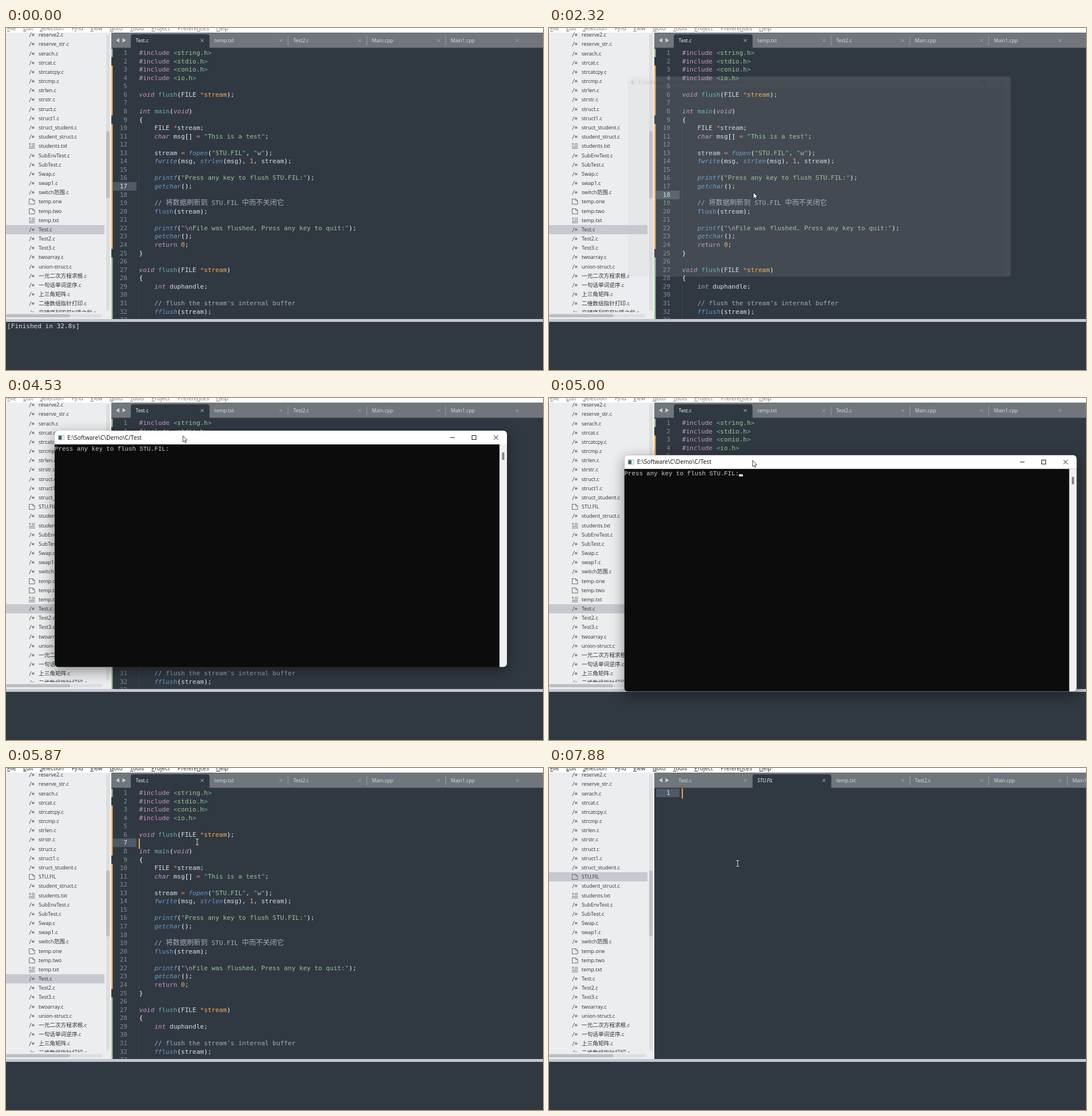
Recreate the animation shown at these times as an HTML page with a canvas. Size 938 px wide and 597 px high, loop 8000 ms.

```html
<!DOCTYPE html>
<html lang="en">
<head>
<meta charset="utf-8">
<title>Editor and console</title>
<style>
html, body { margin: 0; width: 100%; height: 100%; overflow: hidden; background: #303841; }
canvas { display: block; width: 938px; height: 597px; }
</style>
</head>
<body>
<canvas id="stage"></canvas>
<script>
const W = 938, H = 597, LOOP = 8000;
const canvas = document.getElementById('stage');
const ctx = canvas.getContext('2d');
const dpr = window.devicePixelRatio || 1;
canvas.width = W * dpr;
canvas.height = H * dpr;

const UI = '"Open Sans", "Noto Sans", sans-serif';
const MONO = '"DejaVu Sans Mono", monospace';
const CJK = '"Noto Sans CJK SC", "Noto Sans CJK", sans-serif';
const C = {
  bg: '#303841', text: '#d8dee9', gutter: '#848b95', mark: '#4e5a65', purple: '#c695c6',
  blue: '#6699cc', green: '#99c794', teal: '#5fb4b4', orange: '#f9ae58', red: '#f97b58',
  grey: '#a6acb9', white: '#ffffff'
};

const FILES = ('reserve2.c reserve_str.c serach.c strcat.c strcatcpy.c strcmp.c strlen.c strstr.c struct.c ' +
  'struct1.c struct_student.c student_struct.c students.txt SubEnvTest.c SubTest.c Swap.c swap1.c ' +
  'switch范围.c temp.one temp.two temp.txt Test.c Test2.c Test3.c twoarray.c union-struct.c ' +
  '一元二次方程求根.c 一句话单词逆序.c 上三角矩阵.c 二维数组指针打印.c 交错序列的前N项之和.c').split(' ');
const FILES_NEW = [...FILES.slice(0, 11), 'STU.FIL', ...FILES.slice(11)];
const TABS = ['Test.c', 'temp.txt', 'Test2.c', 'Main.cpp', 'Main1.cpp'];
const TABS_NEW = ['Test.c', 'STU.FIL', ...TABS.slice(1)];
// label, x, index of the underlined letter
const MENU = [['File', 2, 0], ['Edit', 30, 0], ['Selection', 59, 0], ['Find', 115, 1], ['View', 147, 0],
  ['Goto', 181, 0], ['Tools', 217, 0], ['Project', 254, 0], ['Preferences', 300, 7], ['Help', 367, 0]];

const CODE = String.raw`#include <string.h>
#include <stdio.h>
#include <conio.h>
#include <io.h>

void flush(FILE *stream);

int main(void)
{
    FILE *stream;
    char msg[] = "This is a test";

    stream = fopen("STU.FIL", "w");
    fwrite(msg, strlen(msg), 1, stream);

    printf("Press any key to flush STU.FIL:");
    getchar();

    // 将数据刷新到 STU.FIL 中而不关闭它
    flush(stream);

    printf("\nFile was flushed, Press any key to quit:");
    getchar();
    return 0;
}

void flush(FILE *stream)
{
    int duphandle;

    // flush the stream's internal buffer
    fflush(stream);
`.split('\n');

// each rule: pattern, colour, italic
const RULES = [
  [/^\/\/.*/, C.grey],
  [/^#include/, C.purple],
  [/^(void|int|char)\b/, C.purple, true],
  [/^return\b/, C.purple],
  [/^(fopen|fwrite|strlen|printf|getchar|fflush)\b/, C.blue, true],
  [/^(flush(?=\(FILE)|main)\b/, C.teal],
  [/^flush\b/, C.blue],
  [/^stream(?=\)?;?$)/, C.orange],
  [/^[*=]/, C.red],
  [/^[()[\]{}]/, C.white],
  [/^\d+/, C.orange],
  [/^[\w.]+|^\s+|^./, C.text]
];

function tokenize(line) {
  const out = [];
  let rest = line, str = false;
  const param = /FILE \*stream\)/.test(line);
  const header = line.startsWith('#');
  while (rest) {
    let m, color, italic = false;
    if (rest[0] === '"') { str = !str; m = '"'; color = C.teal; }
    else if (str) {
      m = rest.match(/^\\n|^[^"\\]+/)[0];
      color = m === '\\n' ? C.purple : C.green;
    } else if (header && /[<>]/.test(rest[0])) { m = rest[0]; color = C.teal; }
    else if (header && out.length > 2) { m = rest.match(/^[^>]+/)[0]; color = C.green; }
    else {
      const rule = RULES.find(r => r[0].test(rest) && (param || r[1] !== C.orange || /^\d/.test(rest)));
      m = rest.match(rule[0])[0];
      color = rule[1];
      italic = !!rule[2];
    }
    out.push({ s: m, color, italic });
    rest = rest.slice(m.length);
  }
  return out;
}
const TOKENS = CODE.map(tokenize);

const clamp = v => Math.max(0, Math.min(1, v));
const ease = v => v * v * (3 - 2 * v);
const prog = (t, a, b) => ease(clamp((t - a) / (b - a)));

function rect(x, y, w, h, color) {
  ctx.fillStyle = color;
  ctx.fillRect(x, y, w, h);
}

function rounded(x, y, w, h, r, color) {
  ctx.fillStyle = color;
  ctx.beginPath();
  ctx.roundRect(x, y, w, h, r);
  ctx.fill();
}

function path(points, color, width = 1) {
  ctx.strokeStyle = color;
  ctx.lineWidth = width;
  ctx.beginPath();
  points.forEach(([x, y], i) => i ? ctx.lineTo(x, y) : ctx.moveTo(x, y));
  ctx.stroke();
}

function clipped(x, y, w, h, draw) {
  ctx.save();
  ctx.beginPath();
  ctx.rect(x, y, w, h);
  ctx.clip();
  draw();
  ctx.restore();
}

function text(s, x, y, color, font, align = 'left') {
  ctx.font = font;
  ctx.fillStyle = color;
  ctx.textAlign = align;
  ctx.fillText(s, x, y);
}

// Latin and Chinese runs use different fonts; returns the end x
function mixed(s, x, y, color, font, cjkSize) {
  for (const run of s.match(/[\u4e00-\u9fff]+|[^\u4e00-\u9fff]+/g) || []) {
    text(run, x, y, color, run[0] >= '\u4e00' ? `${cjkSize}px ${CJK}` : font);
    x += ctx.measureText(run).width;
  }
  return x;
}

function cross(x, y, r, color, width) {
  path([[x - r, y - r], [x + r, y + r]], color, width);
  path([[x + r, y - r], [x - r, y + r]], color, width);
}

function drawMenu(active) {
  rect(0, 0, W, 8, '#ffffff');
  const color = active ? '#1c1c1c' : '#747474';
  for (const [label, x, key] of MENU) {
    text(label, x, 4, color, `9.9px ${UI}`);
    const from = x + ctx.measureText(label.slice(0, key)).width;
    rect(from, 5, ctx.measureText(label[key]).width, 1, color);
  }
}

function fileIcon(name, y) {
  const color = '#5f6368';
  if (name.endsWith('.c')) {
    path([[40.8, y + 4], [44.2, y - 4]], color, 1);
    for (const a of [0, 60, 120]) {
      const dx = 2.5 * Math.cos(a * Math.PI / 180), dy = 2.5 * Math.sin(a * Math.PI / 180);
      path([[47.3 - dx, y - dy], [47.3 + dx, y + dy]], color, 0.9);
    }
  } else if (name.endsWith('.txt')) {
    [-4, -1.3, 1.4, 4].forEach((d, i) => {
      const x = i === 1 ? 44.5 : i === 0 ? 45 : 40;
      path([[x, y + d], [50.5, y + d]], color, 0.9);
    });
    path([[40, y - 4], [43.5, y - 4]], color, 0.9);
    path([[41.8, y - 4], [41.8, y - 0.5]], color, 0.9);
  } else {
    path([[40.5, y - 4.5], [47, y - 4.5], [50, y - 1.5], [50, y + 4.5], [40.5, y + 4.5], [40.5, y - 4.9]], color, 0.9);
    path([[46.8, y - 4.5], [46.8, y - 1.5], [50, y - 1.5]], color, 0.9);
  }
}

function drawSidebar(files, selected, hover) {
  rect(0, 8, 184, 500, '#ebedee');
  clipped(0, 8, 174, 488, () => {
    files.forEach((name, i) => {
      const y = Math.round(12.3 + 16.17 * i);
      if (name === selected) rect(0, y - 8, 172, 16, '#c8c9d0');
      else if (i === hover) rect(0, y - 8, 172, 16, '#dddfe1');
      fileIcon(name, y);
      mixed(name, 57, y + 3, '#2f3338', `9px ${UI}`, 9.67);
    });
  });
  rounded(175, 11, 6, 482, 3, '#dcdddf');
  const grown = files.length > FILES.length;
  rounded(175, grown ? 179 : 180, 6, grown ? 115 : 117, 3, '#bdbec2');
  rounded(0, 499.5, 168, 5.5, 3, '#dcdddf');
  rounded(0, 499.5, 112, 5.5, 3, '#bdbec2');
}

function drawTabs(tabs, active) {
  rect(184, 8, W - 184, 26.5, '#70767b');
  for (const [x, d] of [[198, -1], [203.5, 1]]) {
    ctx.fillStyle = '#c9cdd1';
    ctx.beginPath();
    ctx.moveTo(x, 17.5);
    ctx.lineTo(x + d * 6, 21.5);
    ctx.lineTo(x, 25.5);
    ctx.fill();
  }
  tabs.forEach((name, i) => {
    const x = 218 + i * 137.6, on = i === active;
    if (on) rounded(x, 11, 137.5, 24, [4, 4, 0, 0], C.bg);
    else if (i && i - 1 !== active) rect(x - 1, 14, 1, 16, '#9a9fa3');
    const italic = name === 'STU.FIL' ? 'italic ' : '';
    text(name, x + 8.5, 24.8, on ? '#ffffff' : '#dde0e3', `${italic}8.6px ${UI}`);
    cross(x + 124.7, 21.8, 2.5, on ? '#c5c9cd' : '#a5aaae', 1);
  });
}

const lineY = n => 43.5 + (n - 1) * 14.565;

function drawCode(lines, current, caret) {
  rect(184, 34.5, W - 184, 474, C.bg);
  clipped(184, 34, W - 184, 474, () => {
    rect(187, Math.floor(lineY(current)) - 7, 41, 15, C.mark);
    if (lines.length > 1) {
      const bar = (from, to, color) =>
        rect(184, lineY(from) - 7.3, 2.4, (to - from + 1) * 14.565, color);
      bar(1, 1, C.green);
      bar(3, 8, C.orange);
      bar(10, 24, C.orange);
      bar(26, 33, C.green);
      rect(232, lineY(10) - 7, 1, 15 * 14.565, '#3b444d');
      rect(232, lineY(29) - 7, 1, 5 * 14.565, '#3b444d');
    }
    lines.forEach((tokens, i) => {
      const y = Math.floor(lineY(i + 1)) + 4;
      text(i + 1, 212, y, i + 1 === current ? C.text : C.gutter, `11.07px ${MONO}`, 'right');
      let x = 232.5;
      for (const k of tokens)
        x = mixed(k.s, x, y, k.color, `${k.italic ? 'italic ' : ''}11.07px ${MONO}`, 12.2);
    });
    if (caret) rect(231.8, lineY(current) - 8, 2, 18, C.orange);
  });
}

function drawConsole(x, y, t) {
  const p = clamp((t - 2290) / 240);
  const scale = 0.824 + 0.176 * p;
  const loaded = t >= 2670;
  ctx.save();
  ctx.globalAlpha = p;
  ctx.translate(x + 395 - 9 * (1 - p), y + 206 - 4.5 * (1 - p));
  ctx.scale(scale, scale);
  ctx.translate(-395, -206);

  const shade = Math.round(12 + 208 * (1 - p));
  const body = `rgb(${shade},${shade},${shade})`;
  ctx.save();
  if (p === 1) {
    ctx.shadowColor = 'rgba(0,0,0,0.42)';
    ctx.shadowBlur = 24 * dpr;
    ctx.shadowOffsetY = 7 * dpr;
  }
  rounded(0, 0, 790, 412.5, 6, body);
  ctx.restore();
  // the frame fades in over the body so that the window starts as one even sheet
  ctx.globalAlpha = p * p;
  rounded(0, 0, 790, 24, [6, 6, 0, 0], '#ffffff');
  rounded(777, 24, 13, 388.5, [0, 0, 6, 0], '#f0f0f0');
  ctx.globalAlpha = p;
  rounded(781.5, 38, 4, 13, 1, p < 1 ? '#333333' : '#858585');

  rect(6, 7.5, 11, 9, '#b9c3c8');
  rect(7, 9, 5, 6.5, '#35626b');
  rect(13, 9, 3, 6.5, '#f2f4f5');
  const title = loaded ? 'E:\\Software\\C\\Demo\\C/Test' : 'E:\\Software\\toolset\\bin\\rn_console_helper.exe';
  text(title, 22, 15.7, '#111111', `10.2px ${UI}`);
  path([[691, 12], [699, 12]], '#111111');
  ctx.strokeRect(729, 8.5, 7, 7);
  cross(770.8, 12, 3.8, '#111111', 1);

  if (loaded) {
    text('Press any key to flush STU.FIL:', 0, 35.3, '#cccccc', '10.75px "Liberation Mono", monospace');
    const blinkOn = t < 3390 || (t >= 3920 && t < 4450) || (t >= 4980 && t < 5510);
    if (blinkOn) rect(200, 33.5, 7, 3.5, '#f2f2f2');
  }
  ctx.restore();
}

// time, x, y of the pointer's hot spot
const MOVES = [[260, 735, 522], [460, 459.5, 384], [660, 459.5, 384], [920, 357, 287],
  [2800, 357, 287], [3000, 331, 40], [3660, 331, 40], [4460, 311, 69], [4530, 309, 66],
  [4860, 309, 66], [5200, 434, 181], [5400, 434, 181], [5600, 334, 129],
  [6010, 334, 129], [6560, 42, 188], [6740, 62, 195], [6880, 62, 195], [7080, 66, 189],
  [7400, 66, 189], [7860, 329.5, 166.5]];

function pointerAt(t) {
  if (t < MOVES[0][0]) return null;
  let i = MOVES.length - 1;
  while (MOVES[i][0] > t) i--;
  const a = MOVES[i], b = MOVES[i + 1] || a;
  const k = a === b ? 0 : prog(t, a[0], b[0]);
  return [a[1] + (b[1] - a[1]) * k, a[2] + (b[2] - a[2]) * k];
}

function drawPointer(x, y, beam) {
  ctx.save();
  ctx.translate(x, y);
  if (beam) {
    path([[0, -5], [0, 5]], '#d5d9dd', 1);
    for (const d of [-5, 5]) path([[-2.5, d], [2.5, d]], '#d5d9dd', 1);
  } else {
    ctx.beginPath();
    [[0, 0], [0, 10.8], [2.5, 8.6], [4.2, 12.2], [5.8, 11.4], [4.2, 8], [7.4, 7.7]]
      .forEach(q => ctx.lineTo(...q));
    ctx.closePath();
    ctx.fillStyle = '#ffffff';
    ctx.fill();
    ctx.strokeStyle = '#111111';
    ctx.lineWidth = 0.8;
    ctx.stroke();
  }
  ctx.restore();
}

function draw(t) {
  ctx.setTransform(dpr, 0, 0, dpr, 0, 0);
  rect(0, 0, W, H, C.bg);
  const opened = t >= 7340;
  const front = t >= 2320 && t < 5870;
  const active = (t >= 1180 && t < 2320) || t >= 5870;
  const files = t >= 2670 ? FILES_NEW : FILES;
  const mouse = pointerAt(t);
  const hover = !front && mouse && mouse[0] < 172 ? Math.round((mouse[1] - 12.3) / 16.17) : -1;
  const line = t < 1180 ? 17 : t < 5870 ? 18 : 7;

  drawCode(opened ? [[]] : TOKENS, opened ? 1 : line, (t >= 1180 && t < 1990) || t >= 5870);
  drawTabs(opened ? TABS_NEW : TABS, opened ? 1 : 0);
  drawSidebar(files, opened ? 'STU.FIL' : 'Test.c', hover);
  drawMenu(active);
  rect(0, 508, W, 5, '#c5c6cf');
  if (t < 1990) text('[Finished in 32.8s]', 2, 524, C.text, `11.07px ${MONO}`);

  if (front) {
    const k = prog(t, 4860, 5200);
    drawConsole(85 + 125 * k, 57 + 114.5 * k, t);
  }
  if (mouse) {
    const [x, y] = mouse;
    const overWindow = front && (t < 5200 ? y > 57 : x > 210 && y > 171);
    drawPointer(x, y, !overWindow && x > 186 && y > 34);
  }
}

function frame(now) {
  draw(now % LOOP);
  requestAnimationFrame(frame);
}
requestAnimationFrame(frame);
</script>
</body>
</html>
```
